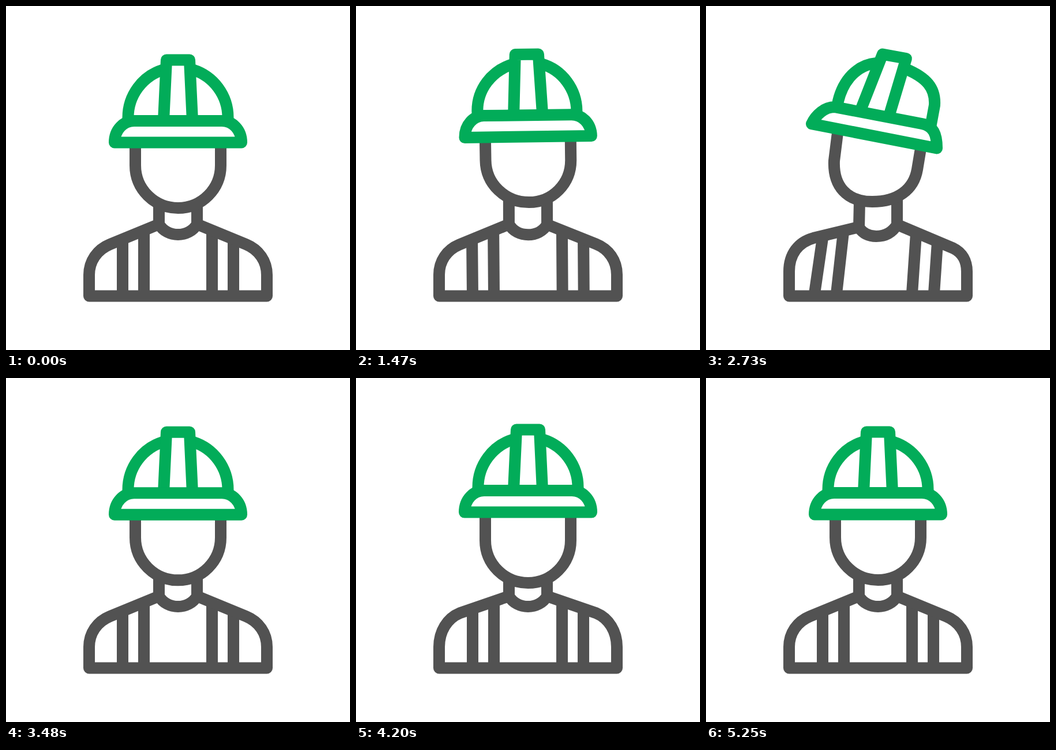
An HTML page that plays this animation: 596x596 px, repeating every 5400 ms.

```html
<!DOCTYPE html>
<html lang="en">
<head>
<meta charset="utf-8">
<title>Worker in a hard hat</title>
<style>
  html, body { margin: 0; width: 100%; height: 100%; overflow: hidden; background: #fff; }
  svg { display: block; width: 100%; height: 100%; }
  path { fill: none; stroke-width: 20; stroke-linejoin: round; }
  #body path { stroke: #525252; }
  #hat path { stroke: #02ac59; }
</style>
</head>
<body>
<svg viewBox="0 0 596 596">
  <g id="body">
    <path id="straps"/><path id="torso"/><path id="neck"/><path id="head"/>
  </g>
  <g id="hat">
    <path id="crown"/><path id="ridge"/><path id="brim"/>
  </g>
</svg>
<script>
const LOOP = 5400, STEP = 30;

// Facing forward; hat, chin and shoulders can shift vertically.
function upright(hat = 0, chin = 0, lift = 0) {
  const h = y => y + hat, c = y => y + chin, s = y => y + lift;
  return {
    straps: `M202 ${s(404)} L202 498 M239 ${s(392)} L239 498 M357 ${s(392)} L357 498 M394 ${s(404)} L394 498`,
    torso: `M265 378 L180 ${s(413)} C158 ${s(422)} 144 ${442 + lift / 2} 144 466 L144 502.5
      L452 502.5 L452 466 C452 ${442 + lift / 2} 438 ${s(422)} 416 ${s(413)} L331 378`,
    neck: `M265 ${c(342)} L265 378 C272 390 285 396 298 396 C311 396 324 390 331 378 L331 ${c(342)}`,
    head: `M224 ${h(236)} L224 ${c(276)} C224 ${c(317)} 257 ${c(350)} 298 ${c(350)}
      C339 ${c(350)} 372 ${c(317)} 372 ${c(276)} L372 ${h(236)}`,
    crown: `M211.5 ${h(200)} L211.5 ${h(193)} C211.5 ${h(155.3)} 236 ${h(121.8)} 272 ${h(110.5)}
      M384.5 ${h(200)} L384.5 ${h(193)} C384.5 ${h(155.3)} 360 ${h(121.8)} 324 ${h(110.5)}`,
    ridge: `M273 ${h(199)} L278 ${h(93.5)} L318 ${h(93.5)} L323 ${h(199)}`,
    brim: `M188 ${h(236.5)} C188 ${h(214)} 204 ${h(199)} 222 ${h(199)}
      L374 ${h(199)} C392 ${h(199)} 408 ${h(214)} 408 ${h(236.5)} Z`
  };
}

const left = {
  straps: 'M189 411 L201.5 498 M227 398 L239 498 M356 394 L366 498 M395 402 L404 498',
  torso: `M264 379 L165 419 C150 426 144 442 144 460 L144 502.5
    L452 502.5 L452 460 C452 428 436 408 410 402 L332 384`,
  neck: 'M263 332 L264 378 C272 393 286 400 302 400 C316 400 326 394 332 384 L330 340',
  head: 'M222 240 L231 284 C238 320 274 341 318 341 C357 343 375 319 375 283 L368 212',
  crown: `M202 210 L195.5 165 C194 135 218 124 249 111
    M357 175 L355.5 164 C349 132 328 100 294 100`,
  ridge: 'M275 193 L247 92 L289 83.5 L325 184',
  brim: 'M194.5 247 C193 225 197 208 216 204 L360 177 C380 173 398 187 406 206 Z'
};

const right = {
  straps: 'M202 402 L188 498 M238 392 L226 498 M364 395 L357 498 M401 410 L395 498',
  torso: `M265 383 L186 402 C160 409 144 430 144 460 L144 502.5
    L452 502.5 L452 460 C452 442 444 427 428 419.5 L332 379`,
  neck: 'M266 338 L265 384 C272 394 283 399 295 399 C311 399 323 392 331 379 L331 332',
  head: 'M229 212 L222 268 C220 312 244 339 288 339 C332 339 360 318 366 283 L373 241',
  crown: `M228 175 L229 165 C238 128 262 102 295 99
    M389 210 L396 172 C398 142 382 124 346 109`,
  ridge: 'M264 190 L306 83.5 L347 91 L316 194',
  brim: 'M183 204 C190 189 206 174 224 175 L374 204 C394 208 400 222 400 246.5 Z'
};

const rest = upright(), raised = upright(-10, -10);

const keys = [
  [0, rest], [720, left], [900, left], [1590, raised], [1800, raised],
  [2520, right], [2700, right], [3420, rest],
  [3960, upright(10, 12, 0)], [4395, upright(-14, 0, -10)],
  [5010, upright(1, 1, -1)], [5250, rest], [LOOP, rest]
];

const NUMBER = /-?\d+(\.\d+)?/g;
const ease = u => (1 - Math.cos(Math.PI * u)) / 2;

function blend(from, to, k) {
  const ends = to.match(NUMBER);
  let i = 0;
  return from.replace(NUMBER, n => (+n + (ends[i++] - n) * k).toFixed(2));
}

function draw(time) {
  const next = keys.findIndex(([at]) => at > time);
  const [t0, from] = keys[next - 1], [t1, to] = keys[next];
  const k = ease((time - t0) / (t1 - t0));
  for (const part in rest)
    document.getElementById(part).setAttribute('d', blend(from[part], to[part], k));
}

const start = performance.now();
function tick() {
  const time = (performance.now() - start) % LOOP;
  draw(Math.floor(time / STEP) * STEP);
  requestAnimationFrame(tick);
}
tick();
</script>
</body>
</html>
```
